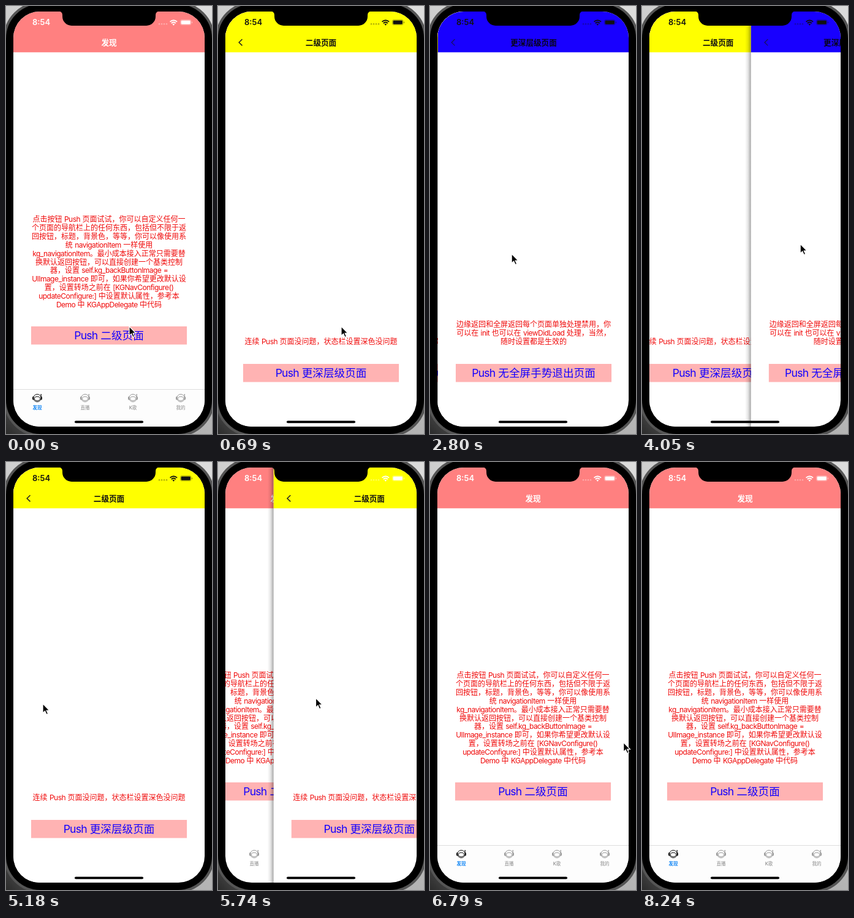
These frames come from a looping animation (336x696 px, 8.42 s). An HTML page:

```html
<!DOCTYPE html>
<html lang="zh-CN">
<head>
<meta charset="utf-8">
<title>Navigation demo</title>
<style>
  html, body { margin: 0; width: 100%; height: 100%; overflow: hidden; background: #000; }
  svg { display: block; width: 336px; height: 696px; }
  text { font-family: Inter, "Noto Sans CJK SC", "Noto Sans CJK", sans-serif; text-anchor: middle; white-space: pre; }
  .latin { letter-spacing: -.045em; }
  .note { font-size: 12px; fill: #f00a0a; }
  .button { font-size: 17.6px; fill: #1400ff; }
  .title { font-size: 12.6px; font-weight: 600; }
  .tab { font-size: 7.5px; font-weight: 500; fill: #8a8a8a; }
  .tab.active { font-weight: 700; fill: #1688f5; }
</style>
</head>
<body>
<svg id="stage" viewBox="0 0 336 696"></svg>
<script>
const LOOP = 8420, WIDTH = 312, PARALLAX = 0.3 * WIDTH;

const progress = (t, from, to) => Math.min(1, Math.max(0, (t - from) / (to - from)));
const smooth = u => u * u * (3 - 2 * u);

// Offset of a page that slides in, then is dragged out to the right.
const slide = (t, push, drag, power) =>
  WIDTH * (1 - smooth(progress(t, ...push)) + progress(t, ...drag) ** power);

const PATH = [
  { t: 0, x: 201, y: 521 }, { t: 700, x: 201, y: 521 },
  { t: 1280, x: 157, y: 600 }, { t: 1880, x: 157, y: 600 },
  { t: 2800, x: 133, y: 403 }, { t: 4050, x: 258, y: 387 },
  { t: 4400, x: 318, y: 382 }, { t: 5180, x: 60, y: 393 },
  { t: 5330, x: 62, y: 392 }, { t: 6190, x: 266, y: 375 },
  { t: 6520, x: 321, y: 373 }, { t: 7580, x: 300, y: 698 }, { t: LOOP, x: 300, y: 720 }
];

function pointerAt(t) {
  const i = PATH.findIndex(p => p.t > t), a = PATH[i - 1], b = PATH[i];
  const u = progress(t, a.t, b.t);
  return [a.x + (b.x - a.x) * u, a.y + (b.y - a.y) * u];
}

const text = (str, x, y, cls, extra = "") =>
  `<text class="${cls}" x="${x}" y="${y}" ${extra}>` +
  str.replace(/[!-~]+/g, '<tspan class="latin">$&</tspan>') + "</text>";
const lines = (list, y) => list.map((s, i) => text(s, 168, y + i * 13.9, "note")).join("");
const button = (label, y) =>
  `<rect x="41" y="${y}" width="254" height="29.5" fill="#ffb3b3"/>` + text(label, 168, y + 21.4, "button");
const back = (color, width) =>
  `<path d="M39.5 54l-5.3 5.2 5.3 5.2" fill="none" stroke="${color}" stroke-width="${width}"/>`;
const page = (id, bar, title, color, body) => `
  <g id="${id}">
    <rect class="shade" x="2" y="9" width="10" height="675" fill="url(#shade)"/>
    <rect x="12" y="9" width="312" height="675" fill="#fff"/>
    <rect x="12" y="9" width="312" height="66.3" fill="${bar}"/>
    ${text(title, 168, 63.7, "title", `fill="${color}"`)}${body}
  </g>`;

const tab = (label, i) => {
  const x = 51 + 78 * i, active = i === 0;
  return `<g transform="translate(${x} 637.5)" fill="none" stroke="${active ? "#111" : "#999"}">
    <circle r="6.2"/><ellipse cy="1" rx="4.6" ry="3.3"/>
    <path d="M-6.3-2.2q-1.5 2.2 0 5M6.3-2.2q1.5 2.2 0 5" stroke-width="2"/>
    <path d="M6.2-1.5V-5.6"/><circle cx="6.2" cy="-5.6" r=".5"/></g>` +
    text(label, x, 656.4, active ? "tab active" : "tab");
};

const home = lines([
  "点击按钮 Push 页面试试，你可以自定义任何一",
  "个页面的导航栏上的任何东西，包括但不限于返",
  "回按钮，标题，背景色，等等，你可以像使用系",
  "统 navigationItem 一样使用",
  "kg_navigationItem。最小成本接入正常只需要替",
  "换默认返回按钮，可以直接创建一个基类控制",
  "器，设置 self.kg_backButtonImage =",
  "UIImage_instance 即可，如果你希望更改默认设",
  "置，设置转场之前在 [KGNavConfigure()",
  "updateConfigure:] 中设置默认属性，参考本",
  "Demo 中 KGAppDelegate 中代码"
], 351) + button("Push 二级页面", 521) +
  '<g id="tabBar"><rect x="12" y="623" width="312" height="61" fill="#fdfdfd"/><path d="M12 623.5h312" stroke="#ddd"/></g>' +
  ["发现", "直播", "K歌", "我的"].map(tab).join("");

const second = back("#222", 1.5) +
  lines(["连续 Push 页面没问题，状态栏设置深色没问题"], 550) + button("Push 更深层级页面", 582);

const third = back("#181060", 1.3) + lines([
  "边缘返回和全屏返回每个页面单独处理禁用，你",
  "可以在 init 也可以在 viewDidLoad 处理，当然，",
  "随时设置都是生效的"
], 522.2) + button("Push 无全屏手势退出页面", 582);

const dots = [0, 1, 2, 3].map(i => `<circle cx="${250 + 4 * i}" cy="29.3" r="1.2" opacity=".35"/>`).join("");

document.getElementById("stage").innerHTML = `
  <defs>
    <linearGradient id="shade">
      <stop offset="0" stop-color="#000" stop-opacity="0"/>
      <stop offset=".5" stop-color="#000" stop-opacity=".1"/>
      <stop offset="1" stop-color="#000" stop-opacity=".35"/>
    </linearGradient>
    <linearGradient id="desk" x1="0" y1="1" x2=".5" y2="0">
      <stop offset="0" stop-color="#2b2b2b"/><stop offset=".25" stop-color="#aaa"/><stop offset="1" stop-color="#dcdcdc"/>
    </linearGradient>
    <clipPath id="screen"><rect x="12" y="9" width="312" height="675" rx="43"/></clipPath>
  </defs>
  <rect width="336" height="696" fill="url(#desk)"/>
  <rect x="-2" y="-5" width="340" height="703" rx="58" fill="#000" stroke="#555" stroke-width="4"/>
  <g clip-path="url(#screen)">
    ${page("first", "#ff8080", "发现", "#fff", home)}
    ${page("second", "#ffff00", "二级页面", "#111", second)}
    ${page("third", "#1800ff", "更深层级页面", "#08041c", third)}
  </g>
  <path d="M86 8.5q6 .5 6 6.5v2a15 15 0 0 0 15 15h122a15 15 0 0 0 15-15v-2q0-6 6-6.5z" fill="#000"/>
  <g id="status">
    <text x="57.5" y="31.2" font-size="13" font-weight="600">8:54</text>
    ${dots}
    <path d="M267.5 25.6q5.8-4.8 11.6 0M269.7 28q3.6-2.9 7.2 0" fill="none" stroke="currentColor" stroke-width="1.8"/>
    <path d="M271.3 29.6q2-1.4 4 0l-2 2.2z"/>
    <rect x="284.4" y="22.4" width="17.6" height="8.4" rx="2.4" fill="none" stroke="currentColor" stroke-opacity=".4" stroke-width=".8"/>
    <rect x="285.5" y="23.5" width="15.4" height="6.2" rx="1.4"/>
    <rect x="302.8" y="25.2" width="1.2" height="2.8" rx=".6" opacity=".45"/>
  </g>
  <rect x="112" y="674.4" width="112" height="3.8" rx="1.9" fill="#000"/>
  <path id="pointer" d="M0 0v15.2l3.5-3.2 2.5 5.6 2.6-1.1-2.5-5.5h4.7z" fill="#000" stroke="#fff" stroke-width="1.2"/>`;

const el = Object.fromEntries(["first", "second", "third", "tabBar", "status", "pointer"]
  .map(id => [id, document.getElementById(id)]));
const show = (node, visible) => node.style.display = visible ? "" : "none";
const move = (node, x, y = 0) => node.setAttribute("transform", `translate(${x} ${y})`);

function place(node, offset, x) {
  show(node, offset < WIDTH);
  show(node.querySelector(".shade"), offset > 0);
  move(node, x);
}

function render(t) {
  const x2 = slide(t, [60, 600], [5330, 6600], 1.22);
  const x3 = slide(t, [1430, 1712], [2720, 4600], 1.83);
  const behind = x => -PARALLAX * (1 - x / WIDTH);
  place(el.first, 0, behind(x2));
  place(el.second, x2, x2 + behind(x3));
  place(el.third, x3, x3);
  show(el.tabBar, x2 >= WIDTH);

  // The status bar takes the style of the page being moved to.
  const dark = (t >= 60 && t < 1430) || (t >= 2720 && t < 5330);
  el.status.style.color = el.status.style.fill = dark ? "#111" : "#fff";
  move(el.pointer, ...pointerAt(t));
}

const start = performance.now();
function frame() {
  render((performance.now() - start) % LOOP);
  requestAnimationFrame(frame);
}
frame();
</script>
</body>
</html>
```
